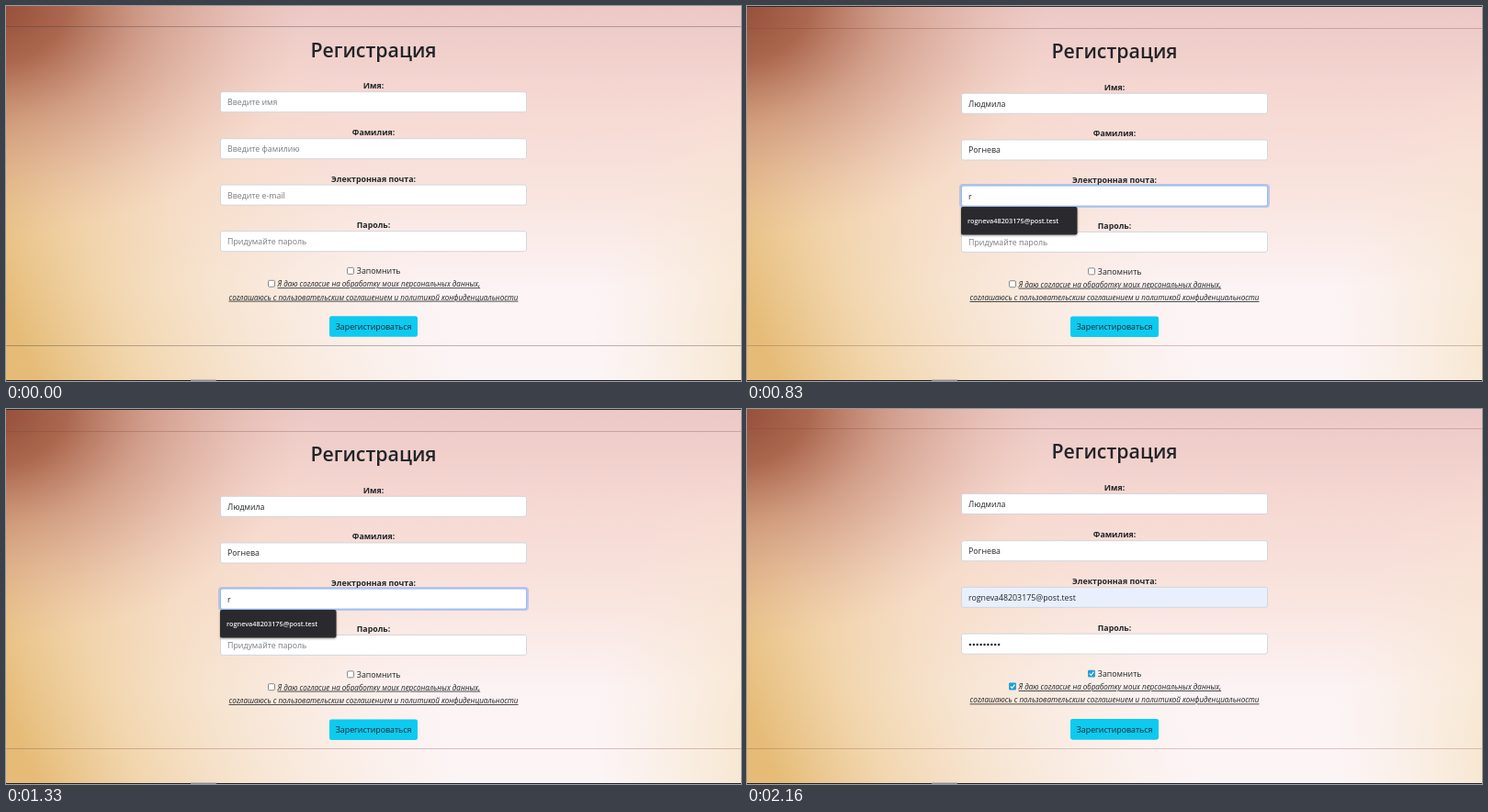
An HTML page for the animation above (2.49 s loop, 800 by 409 pixels).

```html
<!DOCTYPE html>
<html lang="ru">
<head>
<meta charset="utf-8">
<title>Регистрация</title>
<style>
html, body { margin: 0; width: 100%; height: 100%; overflow: hidden; }
svg { display: block; width: 100vw; height: 100vh; }
text { font: 8.8px "Open Sans", "Noto Sans", sans-serif; fill: #212529; }
.mid { text-anchor: middle; }
.title { font-size: 21.3px; font-weight: 600; }
.label { font-weight: 700; }
.hint { fill: #757b81; }
.terms { font-size: 8.05px; font-style: italic; text-decoration: underline; }
.popup { font-size: 7.3px; font-weight: 600; fill: #f1f1f2; }
</style>
</head>
<body>
<svg viewBox="0 0 800 409" preserveAspectRatio="none">
  <defs>
    <linearGradient id="sky" x2="0" y2="1">
      <stop offset="0" stop-color="#ecc8c6"/>
      <stop offset=".25" stop-color="#f6d8d2"/>
      <stop offset=".5" stop-color="#f9e4de"/>
      <stop offset=".75" stop-color="#fcf3f4"/>
      <stop offset="1" stop-color="#fcf5f6"/>
    </linearGradient>
    <linearGradient id="sand" gradientUnits="userSpaceOnUse" x1="0" y1="330" x2="400" y2="160">
      <stop offset="0" stop-color="#e4b870" stop-opacity=".95"/>
      <stop offset=".25" stop-color="#ecc688" stop-opacity=".65"/>
      <stop offset=".5" stop-color="#f0cfa0" stop-opacity=".42"/>
      <stop offset="1" stop-color="#f6dcc0" stop-opacity="0"/>
    </linearGradient>
    <radialGradient id="rust" gradientUnits="userSpaceOnUse" cx="0" cy="0" r="1"
      gradientTransform="translate(-20 0) scale(350 255)">
      <stop offset="0" stop-color="#914a37"/>
      <stop offset=".25" stop-color="#a0573f" stop-opacity=".86"/>
      <stop offset=".5" stop-color="#b46f5c" stop-opacity=".5"/>
      <stop offset=".75" stop-color="#c58678" stop-opacity=".24"/>
      <stop offset="1" stop-color="#d9a59a" stop-opacity="0"/>
    </radialGradient>
    <radialGradient id="cream" gradientUnits="userSpaceOnUse" cx="0" cy="0" r="1"
      gradientTransform="translate(840 380) scale(200 330)">
      <stop offset="0" stop-color="#f5e0bd" stop-opacity=".85"/>
      <stop offset="1" stop-color="#f8e8d2" stop-opacity="0"/>
    </radialGradient>
    <filter id="soft" x="-10%" y="-20%" width="120%" height="150%">
      <feDropShadow dx="0" dy="1" stdDeviation="1.2" flood-opacity=".4"/>
    </filter>
  </defs>
  <rect width="800" height="409" fill="url(#sky)"/>
  <rect width="800" height="409" fill="url(#cream)"/>
  <rect width="800" height="409" fill="url(#sand)"/>
  <rect width="400" height="260" fill="url(#rust)"/>
  <g id="page"></g>
</svg>
<script>
const page = document.getElementById('page');
const STEP = 830;
const FLOOR = 370;
const fields = [
  { y: 87, label: 'Имя:', hint: 'Введите имя' },
  { y: 138, label: 'Фамилия:', hint: 'Введите фамилию' },
  { y: 188.4, label: 'Электронная почта:', hint: 'Введите e-mail' },
  { y: 239, label: 'Пароль:', hint: 'Придумайте пароль' }
];
const mail = 'rogneva48203175@post.test';
const states = [
  { top: 22.5, values: [], rule: '#3c3a48', fade: .36 },
  { top: 24.5, values: ['Людмила', 'Рогнева', 'r'], rule: '#7a3f3c', fade: .3, focus: 2, edge: true },
  { top: 21, values: ['Людмила', 'Рогнева', mail], rule: '#7a3f3c', fade: .26, dots: 9, filled: 2, checked: true }
];

const rect = (x, y, w, h, fill, more = '') =>
  `<rect x="${x}" y="${y}" width="${w}" height="${h}" fill="${fill}" ${more}/>`;
const text = (x, y, str, cls = '') =>
  `<text x="${x}" y="${y}" class="${cls}">${str}</text>`;

function checkbox(x, y, on) {
  if (!on) return rect(x, y, 7, 7, '#fff', 'rx="1.2" stroke="#6f7073" stroke-width=".8"');
  return rect(x - .4, y - .4, 7.8, 7.8, '#1a9fd6', 'rx="1.2"') +
    `<path d="M${x + 1.3} ${y + 3.6}l1.7 1.7 2.9-3.6" fill="none" stroke="#fff" stroke-width="1.2"/>`;
}

function field(f, i, s, at) {
  const y = at(f.y + 7);
  const focus = s.focus === i;
  let out = text(400, at(f.y) + 3.1, f.label, 'mid label');
  if (focus) out += rect(231, y - 2.4, 338, 26, '#0d6efd', 'rx="4" fill-opacity=".25"');
  out += rect(233.5, y - .3, 333, 22, s.filled === i ? '#e8f0fe' : '#fff',
    `rx="2.3" stroke="${focus ? '#86b7fe' : '#ced4da'}" stroke-width=".9"`);
  if (i === 3 && s.dots) {
    for (let k = 0; k < s.dots; k++)
      out += `<circle cx="${242.9 + k * 3.9}" cy="${y + 11.5}" r="1.25" fill="#212529"/>`;
    return out;
  }
  const value = s.values[i];
  return out + text(241, y + 14.2, value || f.hint, value ? '' : 'hint');
}

function popup(y) {
  return rect(233, y, 126.5, 30.5, '#292a2d', 'rx="2" filter="url(#soft)"') +
    text(240, y + 17.8, mail, 'popup');
}

function draw(s) {
  const ratio = (FLOOR - s.top) / (FLOOR - 22.5);
  const at = y => FLOOR - (FLOOR - y) * ratio;
  const rule = y => rect(0, Math.floor(y), 800, 1, s.rule, `fill-opacity="${s.fade}"`);
  let out = rule(s.top) + rule(FLOOR);
  out += text(400, at(48) + 7.5, 'Регистрация', 'mid title');
  fields.forEach((f, i) => out += field(f, i, s, at));
  out += checkbox(371.5, at(285.4), s.checked) + text(381.8, at(289) + 3.2, 'Запомнить');
  out += checkbox(285.5, at(299.3), s.checked);
  out += text(295.5, at(303.3) + 3, 'Я даю согласие на обработку моих персональных данных,', 'terms');
  out += text(400, at(317.7) + 3,
    'соглашаюсь с пользовательским соглашением и политикой конфиденциальности', 'mid terms');
  out += rect(352, at(338.2), 96, 22.6, '#0dcaf0', 'rx="2.3"');
  out += text(400, at(349.8) + 3.2, 'Зарегистироваться', 'mid');
  if (s.focus === 2) out += popup(219);
  if (s.edge) out += rect(0, 0, 800, 1, '#2d2a2e');
  out += rect(0, 408, 800, 1, '#20202c') + rect(201, 407.6, 28, 1.4, '#8d8a96');
  page.innerHTML = out;
}

let shown = -1;
function tick() {
  const i = Math.floor(performance.now() / STEP) % states.length;
  if (i !== shown) draw(states[shown = i]);
  requestAnimationFrame(tick);
}
tick();
</script>
</body>
</html>
```
